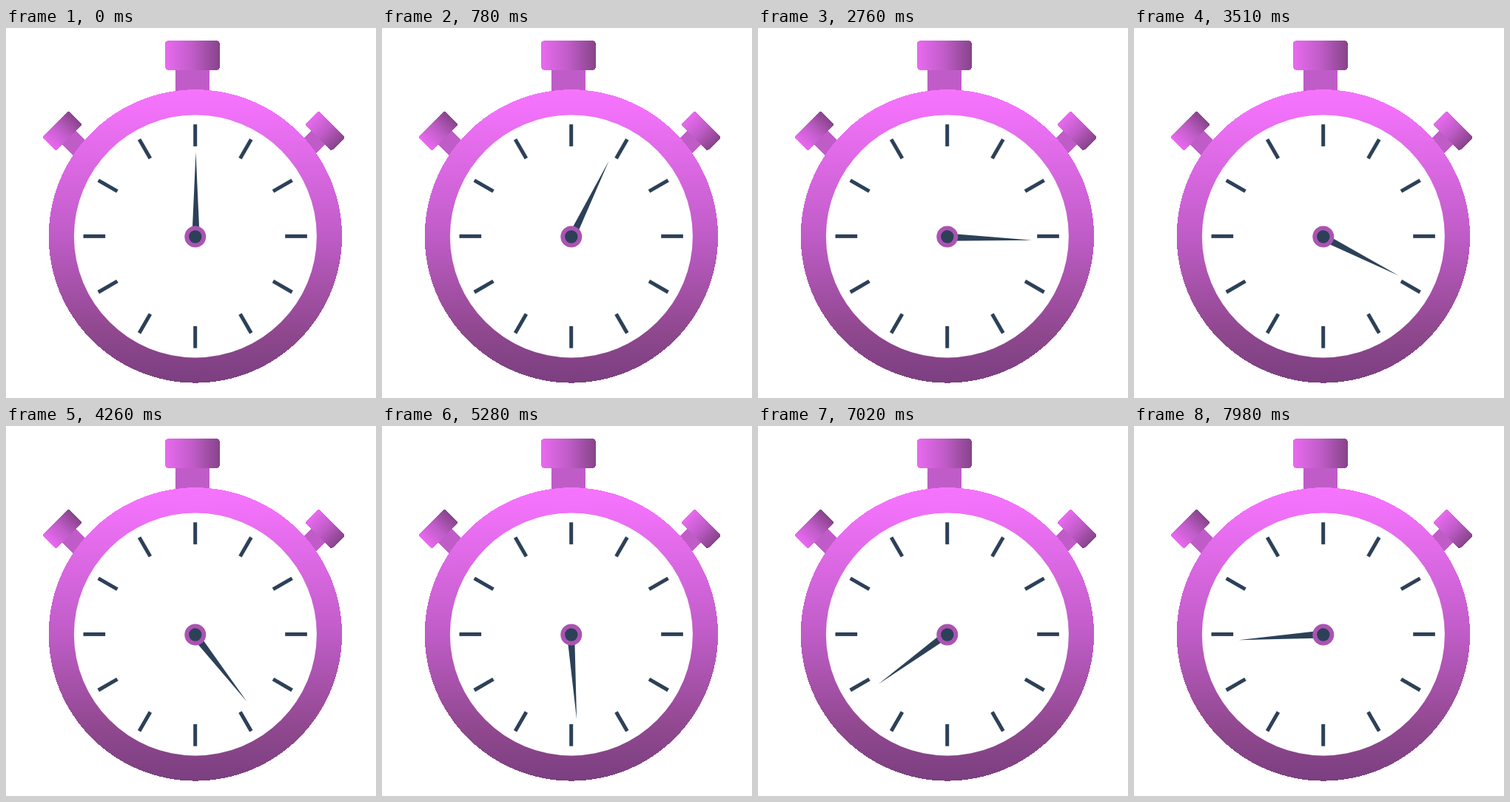
Write an HTML page that moves like this. It is 500 px wide and 500 px high and loops after 8000 ms.

```html
<!DOCTYPE html>
<html lang="en">
<head>
<meta charset="utf-8">
<title>Stopwatch</title>
<style>
  html, body { margin: 0; height: 100%; overflow: hidden; background: #fff; }
  svg { display: block; width: 100%; height: 100%; }
</style>
</head>
<body>
<svg viewBox="0 0 500 500">
  <defs>
    <linearGradient id="ring" x2="0" y2="1">
      <stop stop-color="#f574fd"/>
      <stop offset=".06" stop-color="#f272fa"/>
      <stop offset=".5" stop-color="#bf5cc7"/>
      <stop offset=".82" stop-color="#90488f"/>
      <stop offset="1" stop-color="#7b3f80"/>
    </linearGradient>
    <linearGradient id="cap">
      <stop stop-color="#e96af0"/>
      <stop offset=".5" stop-color="#c05cc8"/>
      <stop offset="1" stop-color="#87448a"/>
    </linearGradient>
    <g id="side">
      <rect x="-13" y="8" width="26" height="36" fill="#c05cc8"/>
      <rect x="-25.4" y="-13.2" width="50.8" height="26.4" rx="3" fill="url(#cap)"/>
    </g>
  </defs>

  <g shape-rendering="crispEdges">
    <rect x="229" y="50" width="46" height="45" fill="#c05cc8"/>
    <rect x="215" y="17" width="74" height="40" rx="4.5" fill="url(#cap)"/>
    <use href="#side" transform="translate(76 139) rotate(-45)"/>
    <use href="#side" transform="translate(431.2 139) rotate(45)"/>
    <circle cx="255.9" cy="281.4" r="198.2" fill="url(#ring)"/>
  </g>
  <circle cx="255.9" cy="281.4" r="164" fill="#fff"/>

  <g id="ticks" stroke="#2c4158" stroke-width="5"></g>
  <path id="hand" d="M251.4 282L256.5 167.5L261.6 282Z" fill="#2c4158"/>
  <circle cx="255.8" cy="282" r="14.5" fill="#ab53b2"/>
  <circle cx="255.8" cy="282" r="8.7" fill="#2c4158"/>
</svg>
<script>
  const LOOP = 8000, STEP = 30;   // the hand advances one degree per step
  const ticks = document.getElementById('ticks');
  const hand = document.getElementById('hand');

  for (let angle = 0; angle < 360; angle += 30) {
    const tick = document.createElementNS(ticks.namespaceURI, 'path');
    tick.setAttribute('d', 'M0-121.5V-151.2');
    tick.setAttribute('transform', `translate(255.7 281.4) rotate(${angle})`);
    ticks.append(tick);
  }

  function draw() {
    const degrees = Math.floor(performance.now() % LOOP / STEP);
    hand.setAttribute('transform', `rotate(${degrees} 255.8 282)`);
    requestAnimationFrame(draw);
  }
  draw();
</script>
</body>
</html>
```
